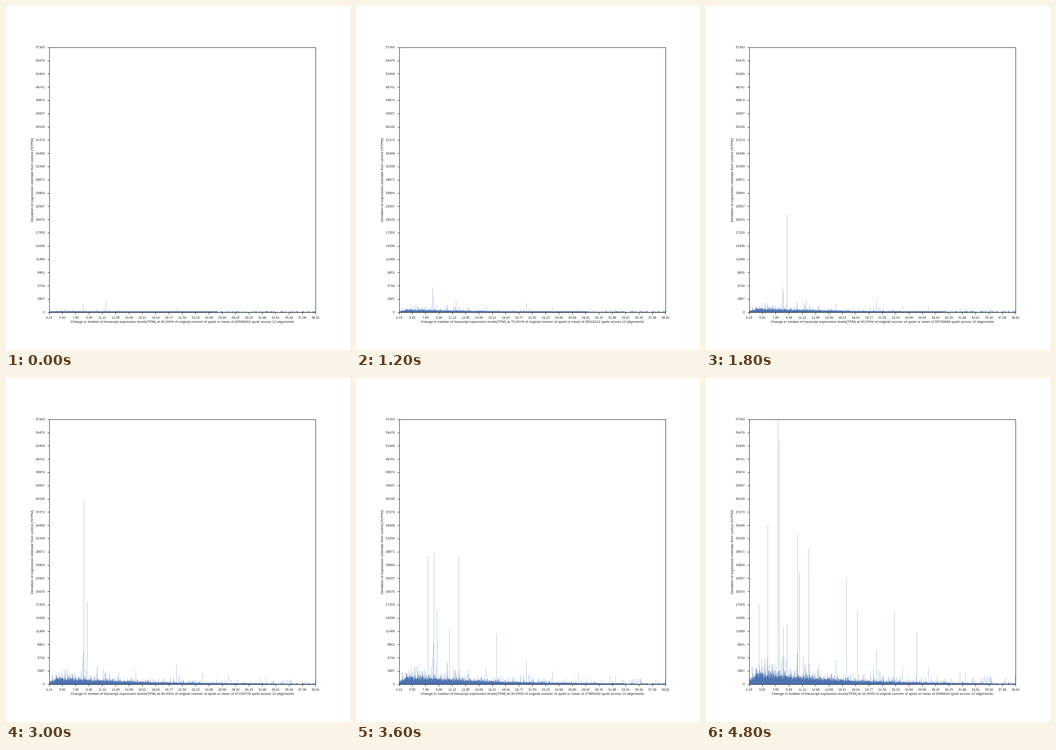
Animation of 748 by 748 pixels, one loop 5.4 s. Source, as an HTML page:

```html
<!DOCTYPE html>
<html lang="en">
<head>
<meta charset="utf-8">
<title>Deviation of expression estimates</title>
<style>
  html, body { margin: 0; width: 100%; height: 100%; overflow: hidden; background: #fff; }
  svg { display: block; width: 748px; height: 748px; }
  text { font-family: "Liberation Sans", Arial, sans-serif; font-size: 6.94px; fill: #262626; text-anchor: middle; }
  .title { font-size: 7.63px; }
  .ytick { text-anchor: end; }
  #axes { fill: none; stroke: #262626; }
  #bars path { fill: none; stroke: #4c72b0; }
</style>
</head>
<body>
<svg viewBox="0 0 748 748">
  <g id="bars">
    <path id="light" opacity=".42"/>
    <path id="medium" opacity=".6"/>
    <path id="solid"/>
  </g>
  <path id="axes"/>
  <g id="labels"></g>
  <text class="title" id="xTitle" x="383.4" y="689.3"/>
  <text class="title" transform="translate(59.3 378.6) rotate(-90)">Deviation of expression estimate from control (%TPM)</text>
</svg>
<script>
const LEFT = 93.5, RIGHT = 673.2, TOP = 89.76, BOTTOM = 665.72;
const STEPS = 9, LAST = STEPS - 1, STEP_MS = 600, TOTAL_SPOTS = 92884446.7;
const $ = id => document.getElementById(id);
const snap = v => Math.floor(v + .5) + .5;

// Outliers: x, first step shown, height there, height at the last step.
const outliers = [
  [217, 0, 27, 30], [166, 1, 53, 60], [176, 3, 213, 130], [169, 5, 400, 60],
  [156, 6, 279, 575], [223, 6, 278, 295], [203, 6, 120, 243], [305, 6, 111, 231],
  [199, 7, 337, 326], [134, 7, 170, 345], [115, 7, 171, 174], [458, 7, 114, 113],
  [409, 7, 68, 158], [159, 8, 528, 528], [329, 8, 161, 161]
];

function randomFrom(seed) {
  return () => {
    seed = (seed * 1664525 + 1013904223) % 4294967296;
    return (seed + 1) / 4294967297;
  };
}

const bar = (x, height) => `M${x + .5} 666V${(BOTTOM - height).toFixed(1)}`;

// A dense band decays to the right under a fringe of heavy-tailed random bars.
function buildBars(step) {
  const random = randomFrom(77);
  const band = 2.2 + 1.6 * step + .2 * step * step;
  const paths = { light: "", medium: "", solid: "" };
  for (let x = 95; x < 673; x++) {
    const [a, b, c, d] = [random(), random(), random(), random()];
    const ramp = Math.min(1, .35 + (x - 95) / 30);
    const base = band * ramp * Math.exp((95 - x) / 185);
    const spread = .35 + 1.2 / band + (x - 95) / 700;
    const floor = x < 460 + 20 * step || a < .3 ? 1.7 : 0;
    if (floor) paths.solid += bar(x, Math.max(floor, base * (.55 + .5 * b)));
    paths.medium += bar(x, Math.max(a < .5 ? 1.7 : 0, base * (.75 - .4 * Math.log(c))));
    if (d < .6) paths.light += bar(x, base * (1 + spread * (-Math.log(d / .6)) ** 1.5));
  }
  for (const [x, first, from, to] of outliers) {
    if (step < first) continue;
    const progress = (step - first) / Math.max(1, LAST - first);
    paths.light += bar(x, from + (to - from) * progress);
  }
  return paths;
}

function drawAxes() {
  let d = "M94.5 90.5H673.5V666.5H94.5Z", labels = "";
  for (let i = 0; i <= 20; i++) {
    const x = LEFT + (RIGHT - LEFT) * i / 20;
    const y = BOTTOM - (BOTTOM - TOP) * i / 20;
    d += `M${snap(x)} 666.5v4M94.5 ${snap(y)}h-4`;
    labels += `<text x="${x}" y="680">${(4.1937 + 1.7306 * i).toFixed(2)}</text>
      <text class="ytick" x="84" y="${y + 2.4}">${Math.round(57342.9 * i / 20)}</text>`;
  }
  $("axes").setAttribute("d", d);
  $("labels").innerHTML = labels;
}

const barPaths = Array.from({ length: STEPS }, (_, step) => buildBars(step));
let shown = -1;

function show(step) {
  shown = step;
  const percent = 90 - 10 * step;
  const spots = Math.floor(TOTAL_SPOTS * percent / 100);
  for (const id in barPaths[step]) $(id).setAttribute("d", barPaths[step][id]);
  $("xTitle").textContent = `Change in median of transcript expression levels(TPM) at ${percent}.0%% ` +
    `of original numner of spots or mean of ${spots} spots across 12 alignments`;
}

const start = performance.now();
function tick() {
  const elapsed = performance.now() - start;
  const step = Math.floor(elapsed / STEP_MS) % STEPS;
  if (step !== shown) show(step);
  requestAnimationFrame(tick);
}

drawAxes();
tick();
</script>
</body>
</html>
```
